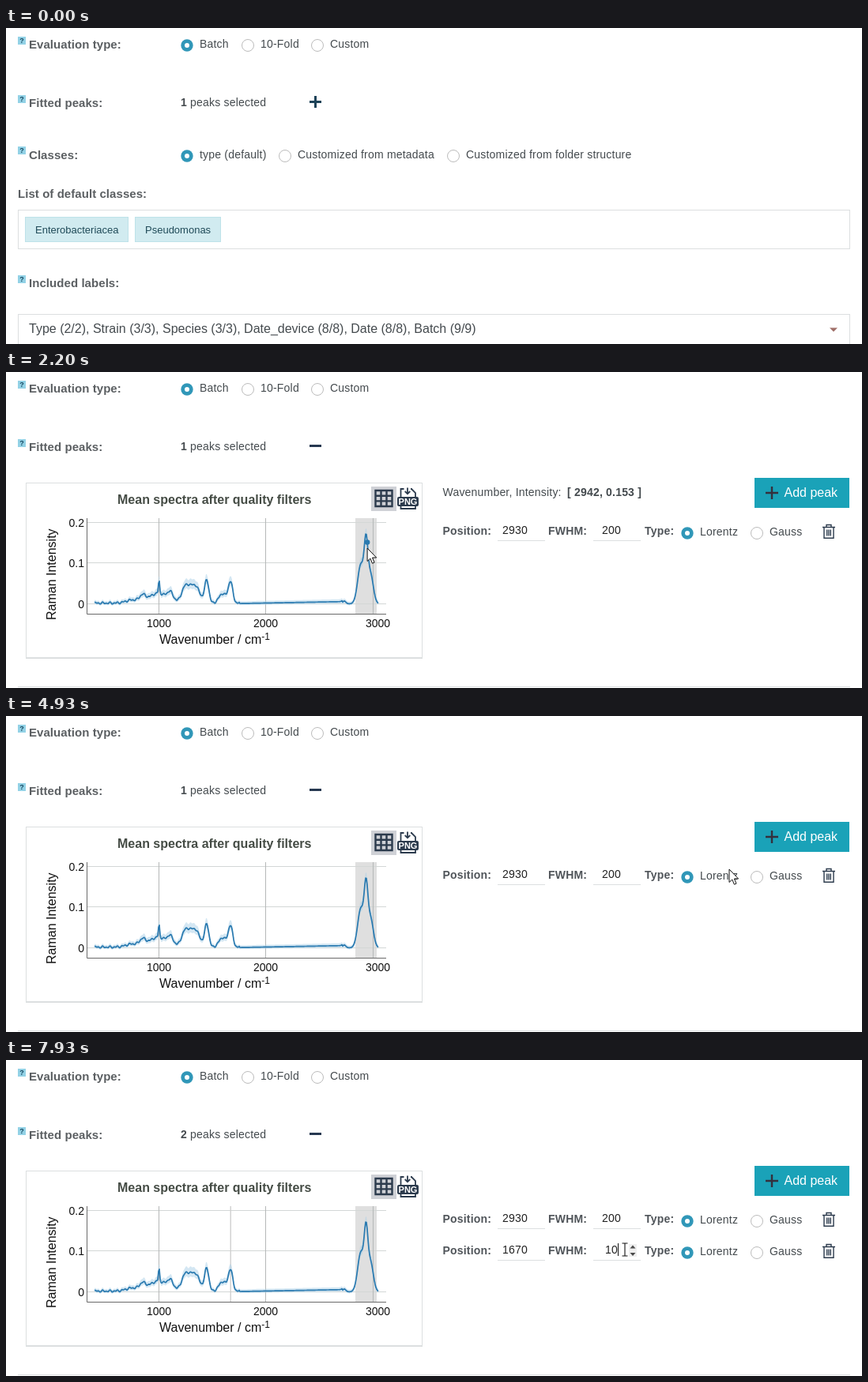
An HTML page that plays this animation: 1083 by 400 pixels, repeating every 8 s.

```html
<!DOCTYPE html>
<html lang="en">
<head>
<meta charset="utf-8">
<title>Fitted peaks form</title>
<style>
  html, body { margin: 0; width: 100%; height: 100%; overflow: hidden; background: #fff; }
  svg { display: block; }
  text { font: 14px "Liberation Sans", Arial, sans-serif; letter-spacing: .2px; fill: #444a4e; white-space: pre; }
  .head { font-weight: bold; font-size: 15px; letter-spacing: .06px; fill: #5b5f62; }
  .bold { font-weight: bold; fill: #50555a; }
  .strong { font-weight: bold; }
  .big { font-size: 16px; letter-spacing: 0; }
  .chip { font-size: 13px; letter-spacing: 0; fill: #1f4a58; }
  .tick { letter-spacing: 0; fill: #111; }
  .ink { fill: #111; }
  .value { fill: #222; }
  .line { fill: none; stroke: #dcdfe0; }
  .grid { fill: none; stroke: #d3d7d6; }
  .icon { fill: none; stroke: #2c3b4d; }
  .chipbox { fill: #d1ebf0; stroke: #bee2e9; }
  .tiny { font-size: 9px; font-weight: bold; letter-spacing: 0; fill: #174a63; }
  .png { font-size: 11px; font-weight: bold; letter-spacing: 0; fill: #fff; }
  .white { fill: #fff; }
</style>
</head>
<body>
<svg width="1083" height="400" viewBox="0 0 1083 400">
  <defs>
    <g id="help">
      <rect x="15" y="-5" width="10" height="10" fill="#93d2e6"/>
      <text class="tiny" x="17.3" y="3.4">?</text>
    </g>
    <g id="on"><circle r="7.7" fill="#3097b8"/><circle r="3" fill="#fff"/></g>
    <circle id="off" r="7.5" fill="#fff" stroke="#bcbcbc"/>
    <path id="trash" class="icon" stroke-width="1.4" d="M1033 196.5h16M1038 196v-2.5h6v2.5M1035 197v13.2h12v-13.2M1038.7 199.5v8M1041 199.5v8M1043.3 199.5v8"/>
    <g id="spin">
      <rect x="45" y="-7" width="10" height="16" fill="#efefef"/>
      <path d="M46.5-1.5l3.5-4 3.5 4zM46.5 4l3.5 4 3.5-4z" fill="#4a4a4a"/>
    </g>
    <path id="arrow" d="M0 0V16.5L3.8 13 6.4 19.2 9 18.1 6.4 12H11.6Z" fill="#fff" stroke="#111" stroke-linejoin="round"/>
    <path id="beam" d="M-3.5-8h7M0-8V8M-3.5 8h7" fill="none" stroke="#111" stroke-width="1.1"/>
    <clipPath id="selClip"><rect class="sel" y="232" height="18"/></clipPath>
  </defs>

  <use href="#help" y="16"/>
  <text class="head" x="29" y="26">Evaluation type:</text>
  <g id="types"></g>
  <use href="#help" y="90"/>
  <text class="head" x="29" y="100">Fitted peaks:</text>
  <text x="221" y="99"><tspan id="count" class="strong">1</tspan> peaks selected</text>
  <path id="toggle" fill="none" stroke-width="3"/>

  <g id="form">
    <use href="#help" y="155"/>
    <text class="head" x="29" y="166">Classes:</text>
    <g id="classes"></g>
    <text class="head" x="15" y="215">List of default classes:</text>
    <rect class="line" x="15.5" y="230.5" width="1052" height="49"/>
    <rect class="chipbox" x="24.5" y="239.5" width="130" height="31"/>
    <text class="chip" x="37" y="260">Enterobacteriacea</text>
    <rect class="chipbox" x="163.5" y="239.5" width="108" height="31"/>
    <text class="chip" x="176" y="260">Pseudomonas</text>
    <use href="#help" y="318"/>
    <text class="head" x="29" y="328">Included labels:</text>
    <rect class="line" x="15.5" y="362.5" width="1052" height="50"/>
    <text class="big" x="29" y="386">Type (2/2), Strain (3/3), Species (3/3), Date_device (8/8), Date (8/8), Batch (9/9)</text>
    <path d="M1042 379.5h10l-5 5z" fill="#a06f68"/>
  </g>

  <g id="panel">
    <path class="line" d="M15 398.5H1068"/>
    <rect class="line" x="25.5" y="140.5" width="501" height="221"/>
    <path class="line" stroke-width="2" d="M25 362H527"/>
    <text class="big strong" x="141" y="167" style="fill:#454c45">Mean spectra after quality filters</text>
    <rect x="462" y="145" width="32" height="31" fill="#cfd1d6"/>
    <path class="icon" stroke-width="2.4" d="M467.5 150h21v20h-21zM474.5 150v20M481.5 150v20M467 156.7h22M467 163.4h22"/>
    <path class="icon" stroke-width="1.8" d="M499.5 158v-10h4M512 148h1l5 5v5M499.5 169v4h18.5v-4M508 146.5v7M504.7 151l3.3 3.3 3.3-3.3"/>
    <rect x="495" y="158" width="27" height="12" rx="2" fill="#2c3b4d"/>
    <text class="png" x="496.6" y="168.2">PNG</text>

    <g id="empty">
      <path class="grid" d="M103 220.5H481M103 270.5H481"/>
      <text class="tick" x="99" y="227" text-anchor="end">2</text>
      <text class="tick" x="99" y="277" text-anchor="end">0</text>
      <circle cx="103" cy="246" r="1.2" fill="#2a7ab0"/>
    </g>
    <g id="plot">
      <rect x="442" y="185" width="27" height="121" fill="#dfdfdf"/>
      <g id="axes"></g>
      <path id="mark" stroke="#cfcfcf" stroke-width="1.4" d="M284.2 185V306"/>
      <polygon id="spread" fill="#a9d0e8" opacity=".5"/>
      <polyline id="curve" fill="none" stroke="#2a7ab0" stroke-width="1.7" stroke-linejoin="round"/>
      <circle id="dot" r="3.3" fill="#2a7ab0"/>
    </g>
    <path fill="none" stroke="#6a6a6a" d="M102.5 185V306.5H481"/>
    <text class="big ink" x="194" y="344">Wavenumber / cm<tspan dy="-5" font-size="12">-1</tspan></text>
    <text class="big ink" transform="translate(63 314) rotate(-90)">Raman Intensity</text>

    <text id="tip" x="552.5" y="157">Wavenumber, Intensity:  <tspan id="tipValue" class="strong" x="710"></tspan></text>
    <rect id="focus" x="944" y="131" width="126" height="44" fill="#93d2dd"/>
    <rect id="add" x="947" y="134" width="120" height="38"/>
    <path d="M961 153h16M969 145v16" stroke="#34303d" stroke-width="2.4"/>
    <text class="big white" x="984.5" y="158">Add peak</text>
    <g id="rows"></g>
    <rect class="sel" y="232" height="18" fill="#3390ff"/>
    <text class="white" x="628" y="245" clip-path="url(#selClip)">3050</text>
    <path id="caret" stroke="#111" d="M0-8V8"/>
    <use id="spinner" href="#spin"/>
  </g>
  <use id="cursor"/>
</svg>
<script>
const LOOP = 8000, STEP = 50;
const OPEN = 1230, LOADED = 1280, ADDED = 5330, SELECT = 5950, TYPED = 6910, CLICK = 7930;

const $ = id => document.getElementById(id);
const show = (id, on) => { $(id).style.display = on ? "" : "none"; };
const set = (id, attrs) => { for (const k in attrs) $(id).setAttribute(k, attrs[k]); };
const clamp = (v, lo, hi) => Math.min(hi, Math.max(lo, v));

const option = (x, y, label, on) =>
  `<use href="#${on ? "on" : "off"}" x="${x}" y="${y}"/><text x="${x + 16}" y="${y + 3}">${label}</text>`;

const peakRow = (id, dy, position, width) => `
  <g id="${id}" transform="translate(0 ${dy})">
    <text class="bold" x="552.5" y="206">Position:</text>
    <text class="value" x="628" y="205">${position}</text>
    <text class="bold" x="686" y="206">FWHM:</text>
    <text class="value" x="766" y="205" text-anchor="middle">${width}</text>
    <path class="line" d="M622 213.5h60M743 213.5h60"/>
    <text class="bold" x="808" y="206">Type:</text>
    ${option(862, 204, "Lorentz", true)}${option(950, 204, "Gauss")}
    <use href="#trash"/>
  </g>`;

$("types").innerHTML = option(229, 22, "Batch", true) + option(306, 22, "10-Fold") + option(394, 22, "Custom");
$("classes").innerHTML = option(229, 162, "type (default)", true) +
  option(353, 162, "Customized from metadata") + option(566, 162, "Customized from folder structure");
$("rows").innerHTML = peakRow("row1", 0, 2930, 200) + peakRow("row2", 40, 3050, 10);
const newPosition = $("row2").querySelector(".value");

// Chart scales
const waveX = w => 194 + (w - 1000) * .1355;
const xWave = x => 1000 + (x - 194) / .1355;
const intensityY = v => 294 - v * 512;
const yIntensity = y => (294 - y) / 512;

$("axes").innerHTML =
  [0, .1, .2].map(v => {
    const y = Math.floor(intensityY(v)) - .5;
    return `<path class="grid" d="M103 ${y}H481"/><text class="tick" x="99" y="${y + 5.5}" text-anchor="end">${v}</text>`;
  }).join("") +
  [1000, 2000, 3000].map(w => {
    const x = Math.floor(waveX(w)) - .5;
    return `<path stroke="#b5b8b8" d="M${x} 185V306"/>
      <text class="tick" x="${w < 3000 ? x : 470.5}" y="323" text-anchor="middle">${w}</text>`;
  }).join("");

// Spectrum: Gaussian bands [centre, height, width] in pixels, plus a ripple where it was measured densely
const bands = [
  [160, 4, 8], [173, 9, 4], [184, 5, 6], [193.6, 17, .8], [195, 11, 8], [208, 12, 4],
  [227, 20, 5], [239, 22, 6], [254, 29, 2.6], [274, 12, 4.5], [284, 27, 2.8],
  [428, 3.5, 2], [449, 50, 4], [455.5, 64, 2.3], [461, 38, 3.6]
];
function curveY(x) {
  const base = x < 296 ? 1.5 + Math.sin(x * 1.3) * .8 + Math.sin(x * .73) * .8
    : x < 426 ? 1 + (x - 296) * .018 : .6;
  return 294 - bands.reduce((h, [c, top, w]) => h + top * Math.exp(-(((x - c) / w) ** 2) / 2), base);
}
const FIRST = 112, LAST = 471;
const curve = Array.from({ length: LAST - FIRST + 1 }, (_, i) => [FIRST + i, curveY(FIRST + i)]);
const spread = y => Math.min(2.5 + (294 - y) * .18, 7);
set("curve", { points: curve.join(" ") });
set("spread", {
  points: [
    ...curve.map(([x, y]) => [x, y - spread(y)]),
    ...curve.map(([x, y]) => [x, y + spread(y) * .8]).reverse()
  ].join(" ")
});

// Pointer moves: start, end, x, y
const home = [846, 376];
const moves = [
  [260, 1060, 393, 95],    // expand button
  [1230, 2000, 441, 214],  // chart
  [2050, 2200, 457.1, 223],
  [2200, 2850, 480, 228],
  [2920, 3220, 635, 200],  // position
  [3220, 3690, 772, 203],  // width
  [3740, 4360, 377, 226],  // chart
  [4510, 4910, 915, 194],
  [4910, 5280, 1000, 153], // add button
  [5330, 5580, 777, 181],
  [5580, 5800, 660, 243],  // new position
  [5950, 6600, 638, 250],
  [7060, 7830, 774, 236],  // new width
  [7880, 7930, 783, 240]
];
const ease = u => u * u * (3 - 2 * u);

function pointer(t) {
  let [x, y] = home;
  for (const [start, end, toX, toY] of moves) {
    if (t < start) break;
    const passed = Math.floor((t - start) / STEP) * STEP;
    const u = ease(Math.min(passed / (end - start), 1));
    x += (toX - x) * u;
    y += (toY - y) * u;
  }
  return [x, y];
}

function hoveredField(x, y, rows) {
  for (let r = 0; r < rows; r++)
    for (const fx of [622, 743])
      if (x >= fx && x <= fx + 60 && y >= 189 + 40 * r && y <= 214 + 40 * r) return { x: fx, y: 200 + 40 * r };
  return null;
}

function drawChartHover(x, y, loaded) {
  const inside = loaded && x >= 102 && x <= 481 && y >= 185 && y <= 306;
  show("dot", inside);
  show("tip", inside);
  if (!inside) return;
  const cx = clamp(x, FIRST, LAST), cy = curveY(cx);
  set("dot", { cx, cy });
  $("tipValue").textContent = `[ ${Math.round(xWave(cx))}, ${yIntensity(cy).toFixed(3)} ]`;
}

function drawSelection(t) {
  const chars = t >= SELECT && t < TYPED ? clamp(Math.floor((t - SELECT) / 130), 0, 4) : 0;
  for (const box of document.querySelectorAll(".sel")) {
    box.setAttribute("x", 660 - chars * 8);
    box.setAttribute("width", chars * 8);
  }
  show("caret", (t >= TYPED && t < TYPED + 500) || t >= CLICK);
  set("caret", { transform: `translate(${t < CLICK ? 660.5 : 774.5} 240)` });
}

function draw(t) {
  const [x, y] = pointer(t);
  const open = t >= OPEN, loaded = t >= LOADED, added = t >= ADDED, typed = t >= TYPED;

  show("form", !open);
  show("panel", open);
  show("empty", !loaded);
  show("plot", loaded);
  show("row2", added);
  show("mark", typed);
  $("count").textContent = added ? 2 : 1;
  newPosition.textContent = typed ? 1670 : 3050;
  const overToggle = t >= 260 && Math.hypot(x - 391, y - 94) < 14;
  set("toggle", {
    d: loaded ? "M384 93.5h15" : "M384 93.5h15M391.5 86v15",
    stroke: loaded || overToggle ? "#263850" : "#1c4258"
  });

  const focused = added && t < SELECT;
  const hover = x >= 947 && x <= 1067 && y >= 134 && y <= 172;
  show("focus", focused);
  set("add", { fill: focused || hover ? "#148296" : "#1aa2b8" });

  drawChartHover(x, y, loaded);
  drawSelection(t);

  const field = open && hoveredField(x, y, added ? 2 : 1);
  show("spinner", !!field);
  if (field) set("spinner", field);
  show("cursor", t >= 260);
  set("cursor", { href: field ? "#beam" : "#arrow", x: x.toFixed(1), y: y.toFixed(1) });
}

const begin = performance.now();
function tick() {
  draw((performance.now() - begin) % LOOP);
  requestAnimationFrame(tick);
}
tick();
</script>
</body>
</html>
```
